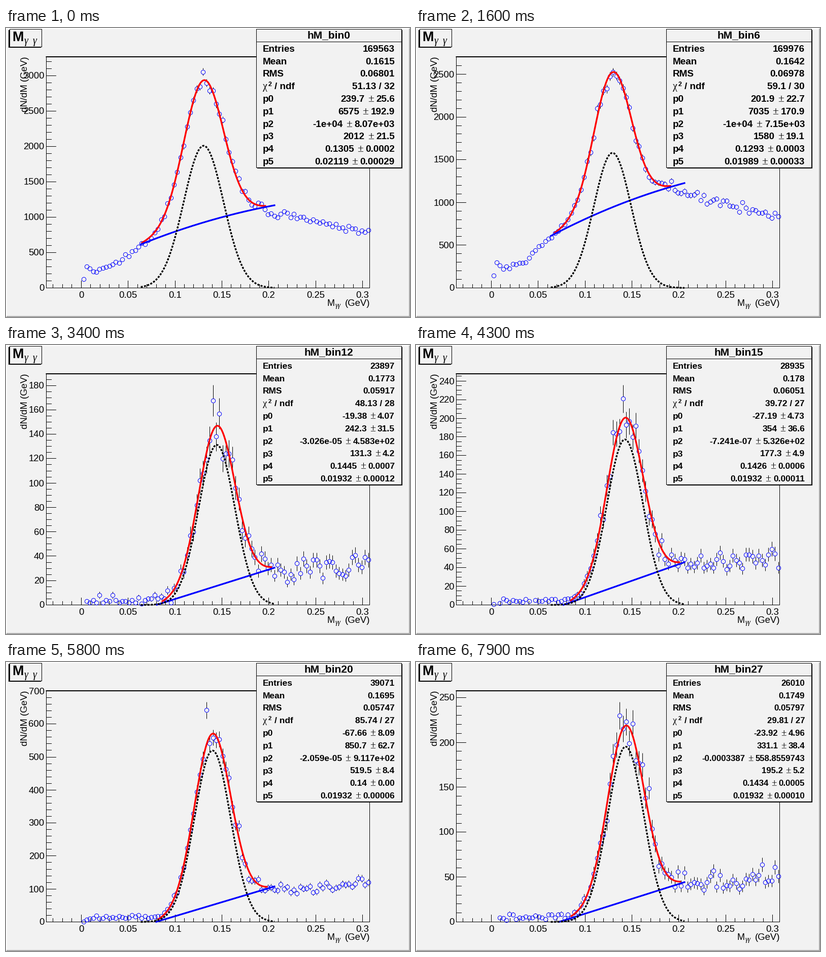
Recreate the animation shown at these times as a matplotlib script. Size 796 px wide and 572 px high, loop 8000 ms.

```python
import math
import numpy as np
import matplotlib.pyplot as plt
from matplotlib.animation import FuncAnimation
from matplotlib.patches import Rectangle

W, H, DPI = 796, 572, 100
PT = 72 / DPI
BG = "#f2f2f2"
LEFT, RIGHT, TOP, BOTTOM = 79.5, 716.5, 57, 514.5
SANS, SERIF = "Liberation Sans", "Liberation Serif"

# Key bins: entries, mean, rms, chi2, ndf, highest count, then p0 to p5.
KEY_BINS = {
    0: (169563, .1615, .06801, 51.13, 32, 3060, 239.7, 6575, -1e4, 2012, .1305, .02119),
    6: (169976, .1642, .06978, 59.1, 30, 2525, 201.9, 7035, -1e4, 1580, .1293, .01989),
    10: (20538, .1769, .05828, 53.73, 28, 132, -14.17, 167.8, -4.995e-5, 100.6, .1458, .01932),
    15: (28935, .178, .06051, 39.72, 27, 221, -27.19, 354, -7.241e-7, 177.3, .1426, .01932),
    20: (39071, .1695, .05747, 85.74, 27, 642, -67.66, 850.7, -2.059e-5, 519.5, .14, .01932),
    24: (183813, .1648, .06969, 60.06, 31, 2798, 223.2, 7232, -1e4, 1742, .1297, .02011),
    27: (26010, .1749, .05797, 29.81, 27, 230, -23.92, 331.1, -.0003387, 195.2, .1434, .01932),
}
# Runs of similar bins: last bin of the run, key bins inside it.
RUNS = [(8, (0, 6)), (21, (10, 15, 20)), (25, (24,)), (27, (27,))]

FIT_FIRST, FIT_LAST = 18, 56
CHANNELS = np.arange(89)
CH_PX = 152.5 + 6.375 * CHANNELS
CH_X = (CH_PX - 148.2) / 1848


def to_px(x):
    return 148.2 + 1848 * np.asarray(x)


def blend(b):
    keys = next(keys for last, keys in RUNS if b <= last)
    columns = zip(*(KEY_BINS[k] for k in keys))
    return np.array([np.interp(b, keys, c) for c in columns])


def background(p, x):
    return p[0] + p[1] * x + p[2] * x * x


def gaussian(p, x):
    return p[3] * np.exp(-0.5 * ((x - p[4]) / p[5]) ** 2)


def fit_errors(p):
    """Errors follow the square root of the signal height."""
    root = math.sqrt(p[3])
    if p[0] > 0:
        return (.57 * root, 4.3 * root, 180 * root,
                .48 * root, .0111 / root, .0132 / root)
    return (.355 * root, 2.75 * root, 40 * root,
            .37 * root, .0075 / root, .0014 / root)


def spectrum(b, p, highest):
    base = background(p, CH_X)
    if p[0] > 0:
        floor = base[FIT_FIRST]
        left, right = (.22, .48, .36, .53, 1), (.94, .91, .69)
    else:
        floor = .025 * p[3] + .5
        left, right = (.1, .4, 1, 1, 1.2), (1.1, 1, 1.25)
    y = np.maximum(base, floor) + gaussian(p, CH_X)
    below, above = CHANNELS <= FIT_FIRST, CHANNELS >= FIT_LAST
    y[below] = floor * np.interp(CHANNELS[below], (0, 1, 3, 10, FIT_FIRST), left)
    y[above] = base[FIT_LAST] * np.interp(CHANNELS[above], (FIT_LAST, 62, 88), right)

    noise = np.random.default_rng(100 + b).normal(size=y.size)
    y = np.clip(np.round(y + .9 * np.sqrt(y) * noise), 0, highest)
    y[np.argmax(y)] = highest
    return y


def tick_step(top):
    raw = top / 10
    power = 10 ** math.floor(math.log10(raw))
    lead = raw / power
    nice = 1 if lead <= 1.5 else 2 if lead <= 2.5 else 5 if lead <= 5 else 10
    return nice * power, 4 if nice == 2 else 5


def with_error(value, err):
    text = f"{value:.4g}"
    mantissa, _, exponent = text.partition("e")
    decimals = len(mantissa.partition(".")[2])
    if exponent:
        return text, f"{err:.{max(decimals, 2)}e}"
    return text, f"{err:.{max(decimals, 1)}f}"


def text_width(text, size):
    special = {".": .278, "-": .333, "+": .584}
    return size * sum(special.get(c, .556) for c in text)


fig = plt.figure(figsize=(W / DPI, H / DPI), dpi=DPI, facecolor=BG)
ax = fig.add_axes([0, 0, 1, 1])


def write(x, y, text, size, ha="left", family=SANS, bold=False, z=5, **kw):
    ax.text(x, y, text, fontsize=size * PT, ha=ha, va="baseline", family=family,
            weight="bold" if bold else "normal", zorder=z, **kw)


def box(x0, y0, x1, y1, color, z):
    ax.add_patch(Rectangle((x0, y0), x1 - x0, y1 - y0, fc=color, lw=0, zorder=z))


def outlined(x0, y0, x1, y1, z):
    box(x0, y0, x1, y1, "black", z)
    box(x0 + 1, y0 + 1, x1 - 1, y1 - 1, BG, z)


def line(xs, ys, width=1, color="black", z=2, **kw):
    ax.plot(xs, ys, color=color, lw=width * PT, zorder=z, snap=False, **kw)


def pixel_centre(v):
    return math.floor(v) + .5


def draw_canvas():
    box(0, 0, W, 2, "white", 0)
    box(0, 0, 2, H, "white", 0)
    box(1, H - 2, W, H, "#aaaaaa", 0)
    box(W - 2, 1, W, H, "#aaaaaa", 0)
    box(5, 4, 69, 39, "black", 6)
    outlined(7, 2, 71, 38, 6)
    write(12.5, 26.5, "M", 27, bold=True, z=7)
    for x in (36, 53):
        write(x, 31, "γ", 20, family=SERIF, style="italic", z=7)


def draw_axes(top):
    line([LEFT, RIGHT], [TOP, TOP], 2)
    line([LEFT, LEFT, RIGHT, RIGHT], [TOP, BOTTOM, BOTTOM, TOP])
    for k in range(-3, 31):
        x = pixel_centre(to_px(k / 100))
        line([x, x], [BOTTOM, BOTTOM - (14 if k % 5 == 0 else 7)])
        if k >= 0 and k % 5 == 0:
            write(x, 533.5, f"{k / 100:g}", 18.5, "center")
    step, parts = tick_step(top)
    scale = (BOTTOM - TOP) / top
    for k in range(int(top / step * parts) + 1):
        y = pixel_centre(BOTTOM - k * step / parts * scale)
        major = k % parts == 0
        line([LEFT, LEFT + (19 if major else 10)], [y, y])
        if major:
            write(75.5, y + 6, f"{k // parts * step:g}", 18.5, "right")
    write(633, 550, "M", 18)
    write(649, 553.5, "γγ", 14, family=SERIF, style="italic")
    write(717, 550, "(GeV)", 18.5, "right")
    write(42, 56, "dN/dM (GeV)", 18.7, "right", rotation=90, rotation_mode="anchor")


def draw_data(y, scale):
    shown = y > 0
    x, py = CH_PX[shown], BOTTOM - y[shown] * scale
    err = np.sqrt(y[shown]) * scale
    far = err > 4.5
    for sign in (-1, 1):
        starts = np.clip(py + sign * 4.5, TOP, BOTTOM)
        ends = np.clip(py + sign * err, TOP, BOTTOM)
        ax.vlines(x[far], starts[far], ends[far], color="black", lw=PT, zorder=2)
    ax.plot(x, py, "o", ms=8.3 * PT, mfc="none", mec="blue", mew=PT, zorder=3)


def draw_fit(p, scale):
    def curve(x, y, color, **kw):
        visible = np.where(y >= 0, BOTTOM - y * scale, np.nan)
        line(to_px(x), visible, 3.3, color, 4, **kw)

    half = p[5] * (3.1 if p[0] > 0 else 3)
    near = np.linspace(p[4] - half, p[4] + half, 100)
    wide = np.linspace(.0635, .206, 200)
    curve(near, background(p, near) + gaussian(p, near), "red")
    curve(wide, background(p, wide), "blue")
    curve(wide, gaussian(p, wide), "black", linestyle=(0, (1.2, .8)),
          dash_capstyle="butt")


def draw_stats(b, summary, p):
    entries, mean, rms, chi2, ndf = summary
    box(495, 4, 781, 278, "black", 6)
    outlined(493, 2, 780, 277, 6)
    box(493, 27, 780, 28, "black", 6)
    write(636, 20.5, f"hM_bin{b}", 21, "center", bold=True, z=7)

    fits = [with_error(v, e) for v, e in zip(p, fit_errors(p))]
    longest = max(17, max(len(v) + len(e) + 3 for v, e in fits))
    size = 18.9 - 0.31 * (longest - 17)
    right = 766
    plain = [("Entries", f"{entries:.0f}"), ("Mean", f"{mean:.4g}"),
             ("RMS", f"{rms:.4g}"), ("", f"{chi2:.4g} / {ndf:.0f}")]
    rows = [46.9 + 24.8 * k for k in range(10)]
    for y, (label, value) in zip(rows, plain):
        write(506, y, label, size, bold=True, z=7)
        write(right, y, value, size, "right", bold=True, z=7)
    write(506.5, rows[3], "χ", size + 1, family=SERIF, z=7)
    write(517, rows[3] - 6, "2", size * .66, bold=True, z=7)
    write(529, rows[3], "/ ndf", size, bold=True, z=7)
    for k, (y, (value, err)) in enumerate(zip(rows[4:], fits)):
        start = right - text_width(err, size)
        write(506, y, f"p{k}", size, bold=True, z=7)
        write(right, y, err, size, "right", bold=True, z=7)
        write(start - .55 * size, y, "±", size * 1.15, "center", SERIF, z=7)
        write(start - 1.2 * size, y, value, size, "right", bold=True, z=7)


def update(i):
    b = (i + 2) // 3
    ax.clear()
    ax.set(xlim=(0, W), ylim=(H, 0))
    ax.axis("off")
    values = blend(b)
    summary, highest, p = values[:5], values[5], values[6:]
    y = spectrum(b, p, highest)
    top = 1.05 * (highest + math.sqrt(highest))
    scale = (BOTTOM - TOP) / top
    draw_canvas()
    draw_axes(top)
    draw_data(y, scale)
    draw_fit(p, scale)
    draw_stats(b, summary, p)
    return []


anim = FuncAnimation(fig, update, frames=80, interval=100, init_func=lambda: [],
                     repeat=True, repeat_delay=0)
plt.show()
```
